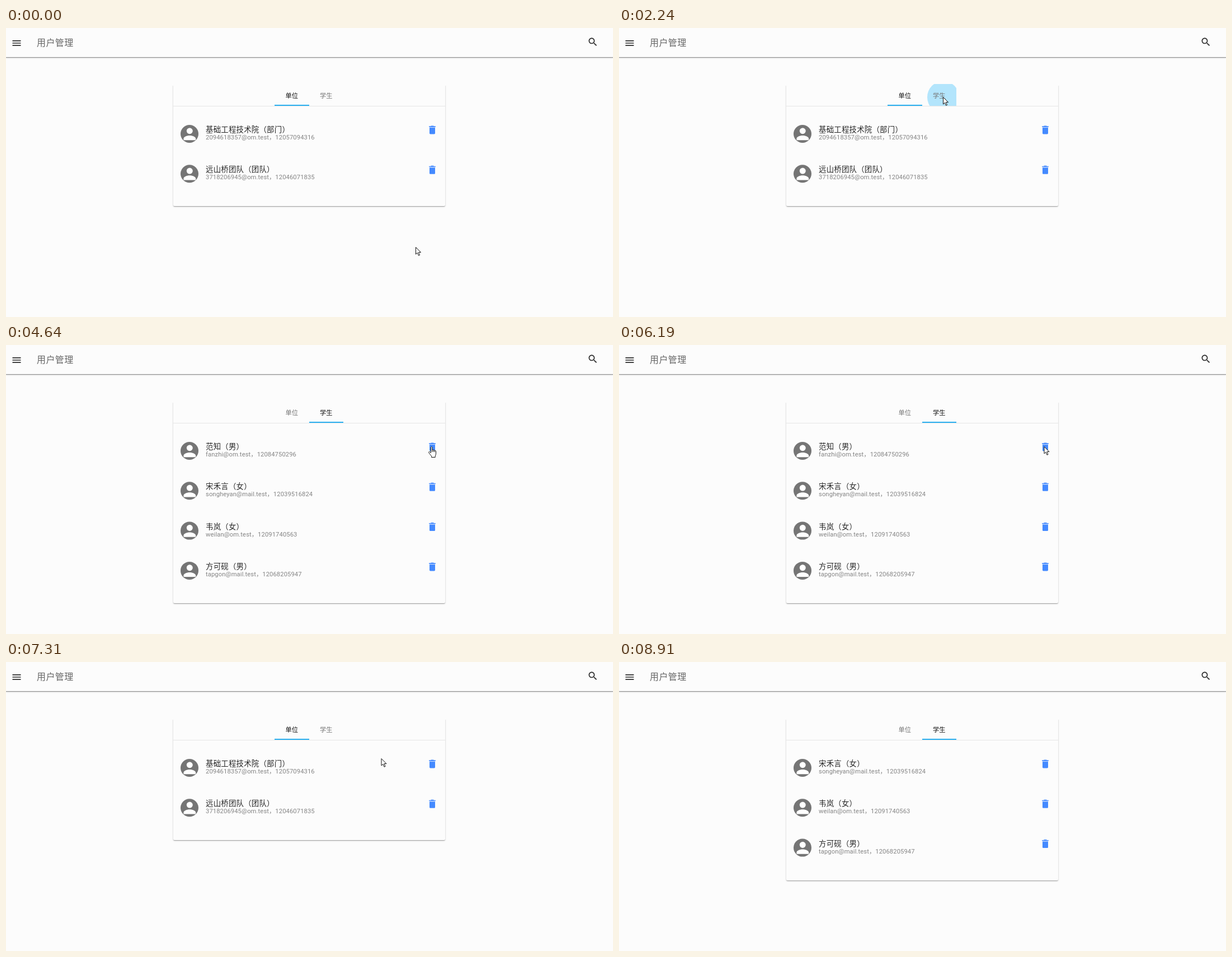
Animation of 1085x516 px, one loop 9570 ms. Source, as an HTML page:

```html
<!DOCTYPE html>
<html lang="zh-CN">
<head>
<meta charset="utf-8">
<title>用户管理</title>
<style>
html, body { margin: 0; width: 100%; height: 100%; overflow: hidden; background: #fcfcfc; }
body { position: relative; font-family: "Noto Sans CJK SC", "Noto Sans CJK", sans-serif; color: #1c1c1c; }
body * { position: absolute; box-sizing: border-box; white-space: nowrap; }
body script, svg * { position: static; }
[hidden] { display: none; }

#bar { left: 0; top: 0; width: 1085px; height: 52px; clip-path: inset(0 0 -6px 0);
  box-shadow: 0 1px 1px rgba(0,0,0,.34), 0 1px 3px rgba(0,0,0,.2); }
#title { left: 55px; top: 14px; font-size: 16px; line-height: 22px; letter-spacing: .4px; font-weight: 300; color: #666; }
.icon { width: 20px; height: 20px; fill: #2b2b2b; }

#card { left: 298.5px; top: 100px; width: 486px; }
#card::before { content: ""; position: absolute; inset: 0; border-radius: 2px; clip-path: inset(3px -6px -6px);
  box-shadow: 0 1px 3px rgba(0,0,0,.2), 0 1px 1px rgba(0,0,0,.14), 0 2px 1px -1px rgba(0,0,0,.12); }
#tabs { left: 0; top: 0; width: 100%; height: 40px; border-bottom: 1px solid #e6e6e6; }
.tab { top: 0; width: 61.5px; height: 39px; overflow: hidden; }
.tab b { left: 0; right: 0; top: 12px; text-align: center; font-size: 11.3px; line-height: 17px; font-weight: 400; color: #757575; }
.tab b.on { color: #111; }
#ripple { border-radius: 50%; background: #b3e5fc; }
#ink { top: 37px; width: 61.5px; height: 2px; background: #2bb0f0; }

.row { left: 0; top: 0; width: 100%; height: 71px; }
.face { left: 13.4px; top: 72.6px; width: 32.6px; height: 32.6px; border-radius: 50%; background: #757575; fill: #fff; }
.name { left: 58.5px; top: 72.4px; font-size: 13.4px; line-height: 16px; letter-spacing: .25px; font-weight: 300; color: #262626; }
.info { left: 58.5px; top: 88.4px; font: 11.2px/16px Roboto, "Noto Sans CJK SC", sans-serif; letter-spacing: .11px; color: #848484; }
.bin { left: 453.5px; top: 72.1px; fill: #448aff; }

#scroll { left: 1080px; top: 0; width: 5px; height: 516px; background: #fcfcfc; }
#scroll i { left: 1.5px; top: 14px; width: 3.5px; height: 457px; background: #c1c1c1; }
.cursor { left: 0; top: 0; overflow: visible; fill: #fff; stroke: #111; stroke-width: 1; stroke-linejoin: round; }

.wide #bar { width: 1079px; }
.wide #card { left: 291.8px; }
.wide .icon, .wide #ink { display: none; }
</style>
</head>
<body>
<div id="bar">
  <svg class="icon" style="left:8.5px;top:17px" viewBox="0 0 24 24"><path d="M3 18h18v-2H3zm0-5h18v-2H3zm0-7v2h18V6z"/></svg>
  <div id="title">用户管理</div>
  <svg class="icon" style="left:1038.5px;top:15px" viewBox="0 0 24 24"><path d="M15.5 14h-.79l-.28-.27C15.41 12.59 16 11.11 16 9.5 16 5.91 13.09 3 9.5 3S3 5.91 3 9.5 5.91 16 9.5 16c1.61 0 3.09-.59 4.23-1.57l.27.28v.79l5 4.99L20.49 19zm-6 0C7.01 14 5 11.99 5 9.5S7.01 5 9.5 5 14 7.01 14 9.5 11.99 14 9.5 14z"/></svg>
</div>
<div id="card">
  <div id="tabs">
    <div class="tab" style="left:181.5px"><b>单位</b></div>
    <div class="tab" style="left:243px"><i id="ripple"></i><b>学生</b></div>
    <i id="ink"></i>
  </div>
</div>
<div id="scroll"><i></i></div>
<svg class="cursor" id="arrow" width="10" height="16"><path d="M.5 .5V13l2.9-2.7 2.1 5 2-.9-2.1-4.8h4.1z"/></svg>
<svg class="cursor" id="hand" width="14" height="20"><path d="M4.4 11.5V2c0-2 2.5-2 2.5 0v4.6c.4-1 2.2-.9 2.3.4.5-.8 2.1-.6 2.2.6.6-.6 2.1-.3 2.1 1v4.6c0 1.8-.9 2.6-1.3 4v2.3H5.6v-2.1C4.3 15.9 2.500 13.600.8 11.300c-.9-1.500.9-2.400 2-1.300z"/><path d="M6.9 6.6V10M9.2 7v3M11.4 7.6V10" fill="none"/></svg>

<script>
const LOOP = 9570, PITCH = 71.3;
const $ = id => document.getElementById(id);

const people = [
  ['基础工程技术院（部门）', '2094618357@om.test，12057094316'],
  ['远山桥团队（团队）', '3718206945@om.test，12046071835'],
  ['范知（男）', 'fanzhi@om.test，12084750296'],
  ['宋禾言（女）', 'songheyan@mail.test，12039516824'],
  ['韦岚（女）', 'weilan@om.test，12091740563'],
  ['方可砚（男）', 'tapgon@mail.test，12068205947']
];
const facePath = 'M12 12c2.21 0 4-1.79 4-4s-1.79-4-4-4-4 1.79-4 4 1.79 4 4 4zm0 2c-2.67 0-8 1.34-8 4v2h16v-2c0-2.66-5.33-4-8-4z';
const binPath = 'M6 19c0 1.1.9 2 2 2h8c1.1 0 2-.9 2-2V7H6zM19 4h-3.5l-1-1h-5l-1 1H5v2h14z';
const icon = (cls, d) => `<svg class="${cls}" viewBox="0 0 24 24"><path d="${d}"/></svg>`;

const rows = people.map(([name, info]) => {
  const row = document.createElement('div');
  row.className = 'row';
  row.innerHTML = icon('face', facePath) + `<div class="name">${name}</div><div class="info">${info}</div>` + icon('icon bin', binPath);
  $('card').append(row);
  return row;
});
const labels = document.querySelectorAll('.tab b');

// Each view: visible people, active tab
const views = {
  units: { list: [0, 1], tab: 0 },
  students: { list: [2, 3, 4, 5], tab: 1 },
  remaining: { list: [3, 4, 5], tab: 1 },
  reload: { list: [0, 1, 3, 4, 5], tab: -1 }
};
const viewSteps = [[0, 'units'], [2400, 'students'], [6600, 'reload'], [6750, 'units'], [8010, 'remaining']];

// Time, pointer tip and shape
const pointer = [
  [0, 732, 391, 'arrow'], [270, 729, 391, 'arrow'], [430, 690, 318, 'arrow'], [550, 624, 214, 'arrow'],
  [700, 602, 172, 'arrow'], [820, 585, 138, 'hand'], [940, 579, 123, 'hand'], [2240, 579, 123, 'arrow'],
  [2820, 0, 0, ''], [2970, 579, 123, 'hand'], [3680, 566, 142, 'arrow'], [3800, 548, 168, 'arrow'],
  [3920, 535, 182, 'arrow'], [4070, 581, 199, 'arrow'], [4220, 668, 198, 'arrow'], [4340, 746, 197, 'arrow'],
  [4490, 758, 189, 'hand'], [4640, 760, 181, 'hand'], [6190, 759.5, 181, 'arrow'], [7310, 670.5, 172, 'arrow'],
  [7460, 630, 153, 'arrow'], [7580, 594, 134, 'hand'], [7740, 577, 121, 'hand'], [7890, 577, 121, 'arrow'],
  [8130, 577, 121, 'hand'], [8410, 690, 268, 'arrow'], [8530, 831, 431, 'arrow'], [8670, 922, 480, 'arrow'],
  [8790, 972, 497, 'arrow'], [8910, 0, 0, '']
];

// Time, centre, radius and opacity of the tab ripple
const ripples = [
  [0, 0, 0, 0, 0], [2240, 579, 123, 28.5, 1], [2400, 579, 123, 48, .6], [2550, 0, 0, 0, 0],
  [7890, 577, 121, 28.5, 1], [8010, 577, 121, 48, .6], [8130, 0, 0, 0, 0]
];

const at = (steps, t) => steps.findLast(s => s[0] <= t);

function showView(name, t) {
  const { list, tab } = views[name], wide = tab < 0;
  document.body.classList.toggle('wide', wide);
  $('scroll').hidden = !wide;
  rows.forEach((row, i) => {
    const slot = list.indexOf(i);
    row.hidden = slot < 0;
    const gap = wide && slot > 1 ? 24.3 : 0;
    row.style.transform = `translateY(${slot * PITCH + gap}px)`;
  });
  $('card').style.height = 75.7 + list.length * PITCH + (wide ? 100 : 0) + 'px';
  $('ink').style.left = (tab ? 243 : 181.5) + 'px';
  const settling = t >= 2400 && t < 2820;
  labels.forEach((label, i) => label.classList.toggle('on', i === tab && !(i && settling)));
}

function showRipple([, x, y, r, alpha]) {
  Object.assign($('ripple').style, {
    left: x - r - 541.5 + 'px', top: y - r - 100 + 'px',
    width: 2 * r + 'px', height: 2 * r + 'px', opacity: alpha
  });
}

function showPointer([, x, y, shape]) {
  for (const id of ['arrow', 'hand']) {
    const style = $(id).style;
    style.display = id === shape ? 'block' : 'none';
    style.transform = `translate(${x - (id === 'hand' ? 5 : 0)}px, ${y}px)`;
  }
}

function draw(now) {
  const t = now % LOOP;
  showView(at(viewSteps, t)[1], t);
  showRipple(at(ripples, t));
  showPointer(at(pointer, t));
}

let start;
function tick(now) {
  start ??= now;
  draw(now - start);
  requestAnimationFrame(tick);
}
draw(0);
requestAnimationFrame(tick);
</script>
</body>
</html>
```
